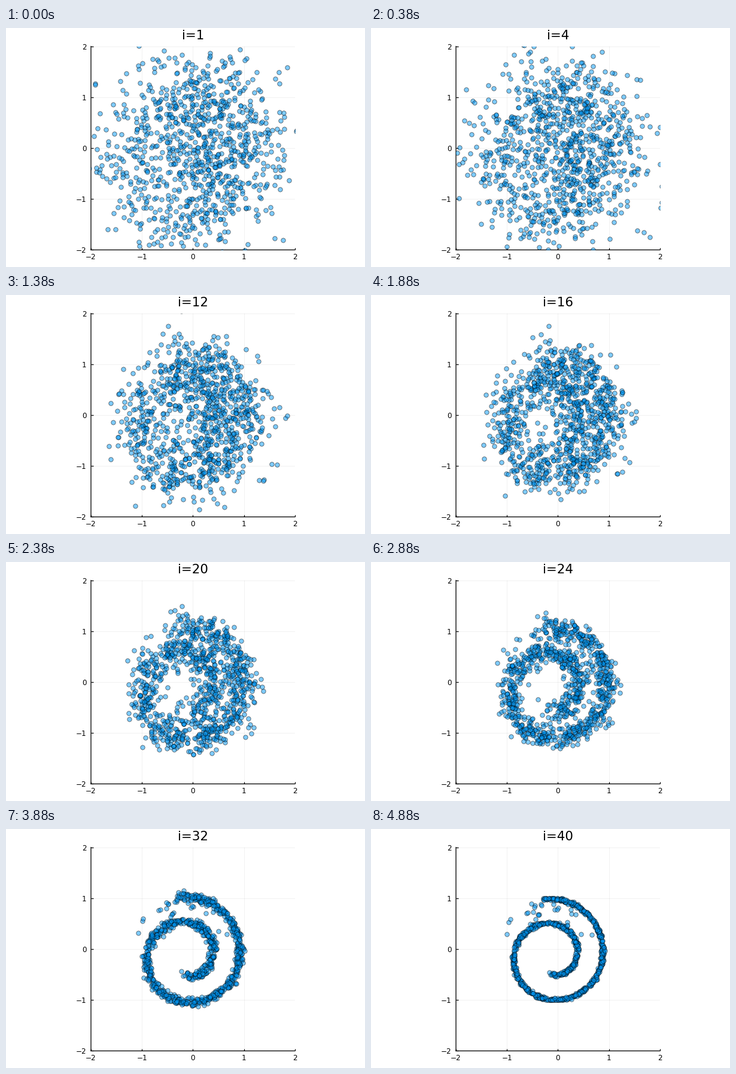
A matplotlib script for the animation above (6260 ms loop, 600 by 400 pixels).

```python
import numpy as np
import matplotlib.pyplot as plt
from matplotlib.animation import FuncAnimation

WIDTH, HEIGHT, DPI = 600, 400, 100
PT = 72 / DPI  # points per pixel
LOOP_MS, INTERVAL = 6260, 20
STEP_MS, STEPS = 125, 40
COUNT, STRAYS = 1000, 28

plt.rcParams["font.family"] = "DejaVu Sans"
rng = np.random.default_rng(7)


def spiral(angle, radius):
    unit = np.column_stack([np.cos(angle), np.sin(angle)])
    return .0793 * radius[:, None] * unit - .12


def make_targets():
    """Points spread evenly along the spiral, plus a few in the gap near its end."""
    first, last = 1.5 * np.pi - .08, 4.5 * np.pi + .15
    arm = np.sqrt(rng.uniform(first ** 2, last ** 2, COUNT - STRAYS))
    gap = rng.normal(4.5 * np.pi, .5, STRAYS)
    inward = 2 * np.pi * rng.uniform(.1, .9, STRAYS)
    targets = np.vstack([spiral(arm, arm), spiral(gap, gap - inward)])
    return rng.permutation(targets)


def denoise(targets):
    """Positions at every step: slowly drifting noise that shrinks onto the targets."""
    keep = .995
    noise = rng.standard_normal(targets.shape)
    path = []
    for step in range(STEPS):
        left = 1 - step / (STEPS - 1)
        sigma = .018 + .56 * left ** 2
        path.append(targets * (1 + .22 * left) + sigma * noise)
        fresh = rng.standard_normal(targets.shape)
        noise = keep * noise + np.sqrt(1 - keep ** 2) * fresh
    path[-1] = np.clip(path[-1], -1, 1)
    return path


positions = denoise(make_targets())

fig = plt.figure(figsize=(WIDTH / DPI, HEIGHT / DPI), dpi=DPI, facecolor="white")
ax = fig.add_axes([142 / WIDTH, 1 - 371.4 / HEIGHT, 340.7 / WIDTH, 340.7 / HEIGHT])
ax.set(xlim=(-2, 2), ylim=(-2, 2), xticks=range(-2, 3), yticks=range(-2, 3))
ax.set_axisbelow(True)
ax.grid(color="black", alpha=.07, linewidth=.8 * PT)
ax.spines[["top", "right"]].set_visible(False)
for side in ("left", "bottom"):
    ax.spines[side].set(linewidth=1.3 * PT, snap=False)
ax.tick_params(direction="in", length=3.5 * PT, width=1.3 * PT, labelsize=12 * PT)
ax.tick_params(axis="x", pad=5.4 * PT)
ax.tick_params(axis="y", pad=7.5 * PT)

title = fig.text(312.5 / WIDTH, 1 - 19 / HEIGHT, "", fontsize=21.4 * PT,
                 ha="center", va="baseline")
dots, = ax.plot([], [], "o", markersize=7.4 * PT, markeredgewidth=.9 * PT,
                markerfacecolor=(0, .604, .98, .5), markeredgecolor=(0, 0, 0, .55),
                zorder=3)


def update(frame):
    elapsed = (frame + .5) * INTERVAL
    step = min(int(elapsed // STEP_MS), STEPS - 1)
    dots.set_data(*positions[step].T)
    title.set_text(f"i={step + 1}")
    return dots, title


anim = FuncAnimation(fig, update, frames=LOOP_MS // INTERVAL, interval=INTERVAL,
                     repeat=True, repeat_delay=0)
plt.show()
```
